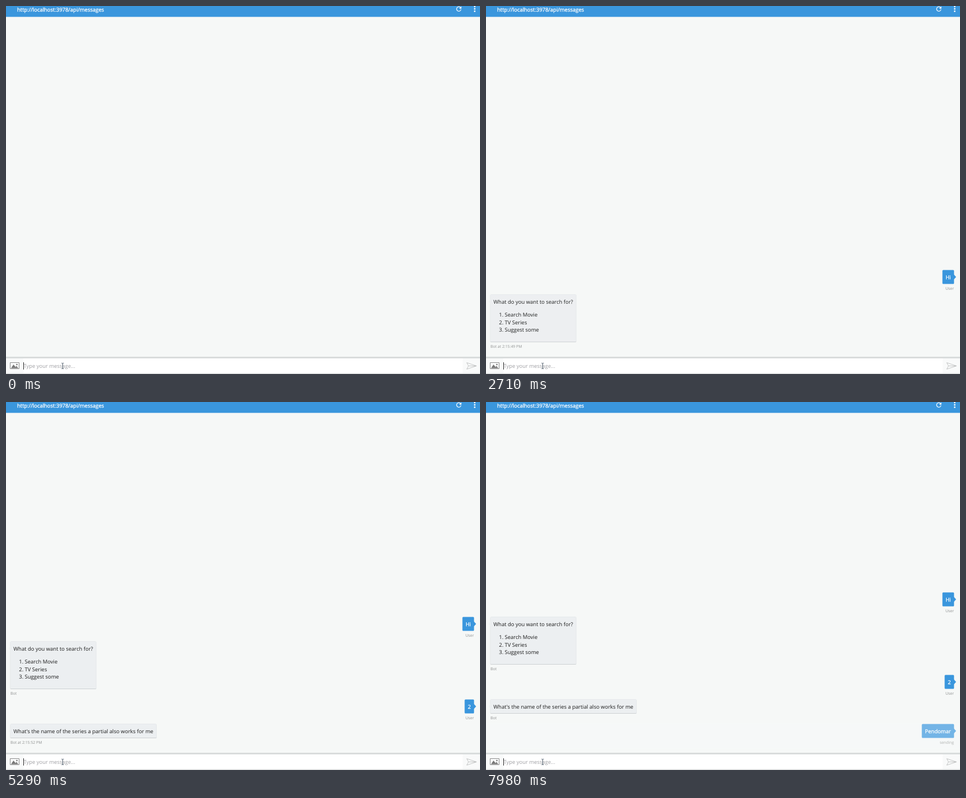
An HTML page with a canvas that plays this animation: 849x660 px, repeating every 8000 ms.

```html
<!DOCTYPE html>
<html lang="en">
<head>
<meta charset="utf-8">
<title>Chat bot</title>
<style>
  html, body { margin: 0; width: 100%; height: 100%; overflow: hidden; background: #f6f8f7; }
  canvas { display: block; }
</style>
</head>
<body>
<canvas width="849" height="660"></canvas>
<script>
const ctx = document.querySelector('canvas').getContext('2d');
const LOOP = 8000, BLUE = '#3a96dd', BACK = '#f6f8f7';
const LEFT = 7.6, RIGHT = 838.3, BOTTOM = 602.4, GAP = 19.2, PAD = 5.7;
const TEXT = 9.48, SMALL = 6.9;

const messages = [
  { at: 1700, from: 'User', time: '2:15:49', text: 'Hi' },
  { at: 2480, from: 'Bot', time: '2:15:49', text: 'What do you want to search for?',
    list: ['Search Movie', 'TV Series', 'Suggest some'] },
  { at: 4410, from: 'User', time: '2:15:52', text: '2' },
  { at: 4820, from: 'Bot', time: '2:15:52', text: "What's the name of the series a partial also works for me" },
  { at: 7810, from: 'User', time: '2:15:55', text: 'Pendomar' }
];

// Times of the key strokes for each message the user sends.
const typing = [
  { text: 'Hi', keys: [970, 1140], sent: 1700 },
  { text: '2', keys: [4030], sent: 4410 },
  { text: 'Pendomar', keys: [6330, 6430, 6660, 6770, 6880, 7110, 7210, 7350], sent: 7810 }
];

function setFont(size) {
  ctx.font = `${size}px "Open Sans", "Noto Sans", sans-serif`;
  ctx.textRendering = 'geometricPrecision';
}

function write(text, x, y, color, size = TEXT, align = 'left') {
  setFont(size);
  ctx.textAlign = align;
  ctx.fillStyle = ctx.strokeStyle = color;
  ctx.fillText(text, x, y);
  // A hairline makes white text as strong as dark text.
  if (color === '#fff') {
    ctx.lineWidth = 0.3;
    ctx.strokeText(text, x, y);
  }
}

function widthOf(text) {
  setFont(TEXT);
  return ctx.measureText(text).width;
}

function rect(x, y, w, h, color) {
  ctx.fillStyle = color;
  ctx.fillRect(x, y, w, h);
}

function fillPath(d, color) {
  ctx.fillStyle = color;
  ctx.fill(new Path2D(d));
}

function strokePath(d, color, width = 1) {
  ctx.strokeStyle = color;
  ctx.lineWidth = width;
  ctx.stroke(new Path2D(d));
}

function roundBox(x, y, w, h, color) {
  ctx.beginPath();
  ctx.roundRect(x, y, w, h, 1.5);
  ctx.fillStyle = color;
  ctx.fill();
}

const heightOf = message => message.list ? 84.8 : 24.8;

function drawMessage(message, top, age, isLast) {
  const mine = message.from === 'User';
  const h = heightOf(message), w = widthOf(message.text) + 2 * PAD;

  let label = message.from;
  if (isLast) label = mine && age < 300 ? 'sending' : `${message.from} at ${message.time} PM`;

  if (mine) {
    const x = RIGHT - w;
    roundBox(x, top, w, h, BLUE);
    fillPath(`M${RIGHT - 0.3} ${top + 7.9}l4 4.5l-4 4.5z`, BLUE);
    write(message.text, x + PAD, top + 16.4, '#fff');
    write(label, 838, top + 35.4, '#8e9090', SMALL, 'right');
  } else {
    roundBox(LEFT, top, w, h + 0.6, '#cdd1d3');
    roundBox(LEFT, top, w, h - 0.4, '#eceff1');
    fillPath(`M${LEFT} ${top + 8.4}l-3 4l3 4z`, '#f0f3f3');
    write(message.text, LEFT + PAD, top + 16.4, '#1c1c1c');
    (message.list || []).forEach((item, i) => {
      const y = top + 39.6 + i * 13.4;
      write(`${i + 1}.`, 31.2, y, '#1c1c1c', TEXT, 'right');
      write(item, 33.5, y, '#1c1c1c');
    });
    write(label, 8, top + h + 10.6, '#8e9090', SMALL);
  }

  // Fade in bubble and label as one group by veiling them with the background.
  const step = Math.floor(age / 75) * 75;
  ctx.globalAlpha = Math.max(0, 1 - (step + 38) / 270);
  rect(0, top - 1, 849, h + 20, BACK);
  ctx.globalAlpha = 1;
}

function drawLog(t) {
  const shown = messages.filter(m => t >= m.at);
  let bottom = BOTTOM;
  for (let i = shown.length - 1; i >= 0; i--) {
    const top = bottom - heightOf(shown[i]);
    drawMessage(shown[i], top, t - shown[i].at, i === shown.length - 1);
    bottom = top - GAP;
  }
}

function drawHeader() {
  rect(0, 0, 849, 19.5, BLUE);
  write('http://localhost:3978/api/messages', 20, 9.6, '#fff');
  strokePath('M814.2 2.8A4 4 0 1 0 815 6.2', '#fff', 1.2);
  fillPath('M815.6 0.8v4h-4z', '#fff');
  for (const y of [1, 5.2, 9.4]) {
    ctx.beginPath();
    ctx.arc(839.5, y, 1.4, 0, 7);
    ctx.fill();
  }
}

function drawFooter(t) {
  rect(0, 629, 849, 31, '#f9fafa');
  rect(0, 629, 849, 3, '#d9dcdc');
  rect(31, 632, 787, 27, '#fff');
  rect(0, 658.5, 849, 1.5, '#dcdede');

  strokePath('M7.5 639.5h16v11h-16z', '#8a8a8a');
  fillPath('M9 649.5l4.5-6.5l3.5 4.5l1.8-2l3.2 4z', '#777');
  fillPath('M18.2 643a1.3 1.3 0 1 0 2.6 0a1.3 1.3 0 1 0-2.6 0', '#777');

  const entry = typing.find(e => t >= e.keys[0] && t < e.sent);
  const typed = entry ? entry.text.slice(0, entry.keys.filter(k => t >= k).length) : '';
  if (typed) write(typed, 31.4, 649.4, '#000');
  else write('Type your message...', 31.4, 649.4, '#a0a0a4');
  rect(typed ? Math.round(31 + widthOf(typed)) : 31, 639, 1, 13, '#222');

  strokePath('M825.3 639.7L842.7 645.5L825.3 651.3L828.4 645.5ZM828.4 645.5H842',
    typed ? '#7db6e8' : '#b4b6b6', 0.8);

  // Text pointer
  strokePath('M99.5 640.5h1.4l.6.6l.6-.6h1.4M101.5 641v9.5M99.5 650.5h1.4l.6-.6l.6.6h1.4', '#4a5866');
}

function draw(now) {
  const t = now % LOOP;
  rect(0, 0, 849, 660, BACK);
  drawLog(t);
  drawHeader();
  drawFooter(t);
}

const start = performance.now();
function tick() {
  draw(performance.now() - start);
  requestAnimationFrame(tick);
}
tick();
</script>
</body>
</html>
```
